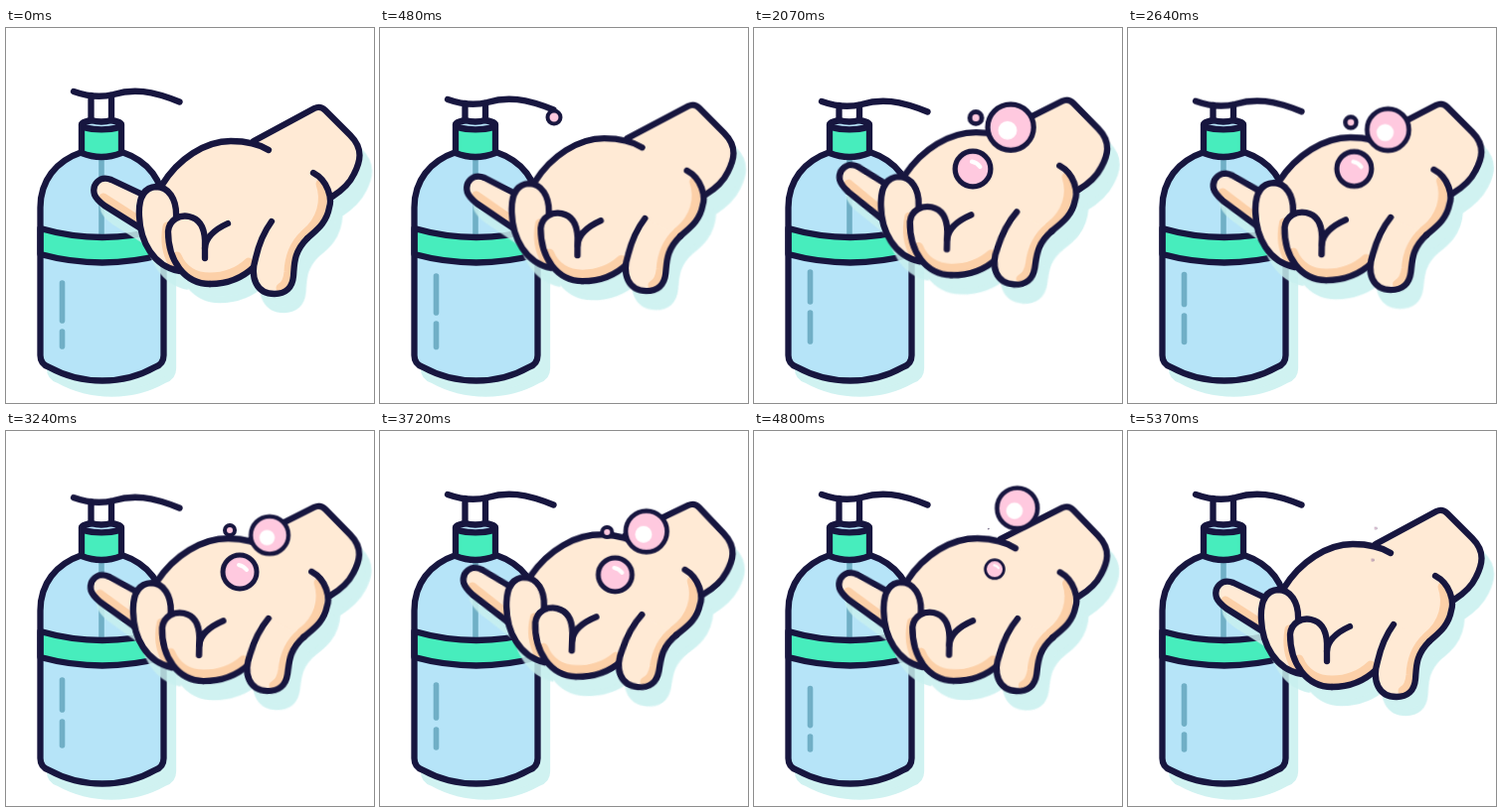
An HTML page that plays this animation: 370x378 px, repeating every 5.4 s.

```html
<!DOCTYPE html>
<html lang="en">
<head>
<meta charset="utf-8">
<title>Hand sanitizer</title>
<style>
html, body { margin: 0; width: 100%; height: 100%; overflow: hidden; background: #fff; }
svg { display: block; width: 100%; height: 100%; }

.line, .shape, .bubble circle { stroke: #17163f; stroke-linecap: round; stroke-linejoin: round; }
.line { fill: none; stroke-width: 6.3; }
.shape { stroke-width: 6.3; }
.skin { fill: #ffead5; }
.shade { fill: none; stroke: #fcd0a8; stroke-width: 9; stroke-linecap: round; }
.shadow { fill: #c8f0ef; stroke: #c8f0ef; stroke-width: 6.3; stroke-linejoin: round; opacity: .85; }
.mark { fill: none; stroke: #70afc6; stroke-width: 5.6; stroke-linecap: round; }
.bubble circle { fill: #ffc9df; }
.bubble .gleam { fill: #fff; stroke: none; }
.bubble path { fill: none; stroke: #fff; stroke-width: 4; stroke-linecap: round; }

.pump, .hand, .index, .thumb, .mark, .bubble { animation: 5400ms linear infinite; }
.pump, .hand, .thumb { animation-timing-function: ease-in-out; }
.pump { animation-name: pump; }
.hand { animation-name: hand; }
.index { animation-name: index; transform-origin: 97px 165px; }
.thumb { animation-name: thumb; transform-origin: 303px 212px; }
.upper { animation-name: upper; }
.lower { animation-name: lower; }
.big { animation-name: big; }
.mid { animation-name: mid; }
.tiny { animation-name: tiny; }
.drop { animation-name: drop; }

@keyframes pump {
  0%, 69%, 100% { transform: translateY(0); }
  13%, 46% { transform: translateY(10px); }
}
@keyframes hand {
  0%, 100% { transform: matrix(1, 0, 0, 1, 0, 0); }
  27.8% { transform: matrix(1.02, .03, -.03, 1.004, -3.8, -20.4); }
  50% { transform: matrix(1.02, .004, -.02, 1, -4.7, -4.5); }
  78% { transform: matrix(1.015, .05, -.04, 1, -1.5, -22.5); }
}
@keyframes thumb {
  0%, 100% { transform: rotate(0); }
  27.8% { transform: rotate(4.5deg); }
  50% { transform: rotate(1deg); }
  78% { transform: rotate(4deg); }
}
@keyframes index {
  0%, 100% { transform: translate(0, 0) rotate(0); }
  25% { transform: translate(1px, 4px) rotate(5deg); }
  38.3% { transform: translate(4px, -3px) rotate(6deg); }
  60% { transform: translate(3px, 1px) rotate(3deg); }
  79% { transform: translate(1px, 0) rotate(5deg); }
}
@keyframes upper {
  0%, 100% { d: path("M56.5 257V295"); }
  8.9% { d: path("M56.5 250V287"); }
  25% { d: path("M56.5 246V282"); }
  38.3% { d: path("M56.5 246V276"); }
  60% { d: path("M56.5 251V281"); }
  79% { d: path("M56.5 262V298"); }
}
@keyframes lower {
  0%, 100% { d: path("M56.5 306V321"); }
  8.9% { d: path("M56.5 298V321.5"); }
  25% { d: path("M56.5 293V320.5"); }
  38.3% { d: path("M56.5 287V316"); }
  60% { d: path("M56.5 293V317"); }
  79% { d: path("M56.5 310V321"); }
}
@keyframes big {
  0%, 12% { transform: translate(238px, 108px) scale(0); }
  25% { transform: translate(251px, 98px) scale(.98); }
  38.3% { transform: translate(258px, 100px) scale(1.05); }
  60% { transform: translate(265px, 105px) scale(.86); }
  79% { transform: translate(271px, 97px) scale(1.04); }
  88% { transform: translate(266px, 76px) scale(1); }
  99.4% { transform: translate(249px, 98px) scale(.06); }
  100% { transform: translate(249px, 98px) scale(0); }
}
@keyframes mid {
  0%, 13% { transform: translate(206px, 122px) scale(0); }
  25% { transform: translate(214px, 129px) scale(1); }
  38.3% { transform: translate(220px, 142px) scale(1.05); }
  60% { transform: translate(235px, 142px) scale(1); }
  79% { transform: translate(238px, 148px) scale(1); }
  99.4% { transform: translate(246px, 130px) scale(.08); }
  100% { transform: translate(246px, 130px) scale(0); }
}
@keyframes tiny {
  0%, 15% { transform: translate(217px, 95px) scale(0); }
  25% { transform: translate(221px, 91px) scale(.95); }
  38.3% { transform: translate(223px, 90.5px) scale(1.2); }
  60% { transform: translate(225px, 100px) scale(1); }
  79% { transform: translate(232px, 104px) scale(1); }
  90%, 100% { transform: translate(236px, 98px) scale(0); }
}
@keyframes drop {
  0%, 4% { transform: translate(175px, 78px) scale(0); }
  8.9% { transform: translate(175px, 90px) scale(1); }
  25% { transform: translate(175px, 113px) scale(1.05); }
  32%, 100% { transform: translate(180px, 122px) scale(0); }
}
</style>
</head>
<body>
<svg viewBox="0 0 370 378" preserveAspectRatio="none">
  <defs>
    <path id="bottle" d="M76.500 125C50 134 34.500 154 34.500 181V330Q34.500 339 43.500 342C76 360 118 360 149.500 342Q158.500 339 158.500 330V181C158.500 154 143 134 116.500 125"/>
    <path id="palm" d="M157 158C173 132 200 114 226 114L249 114L310 81Q316 78 321 83L346 108C360 122 356 135 350 147Q344 160 326 172C325 195 312 205 303 212L250 240Q232 258 205 258C180 258 163 235 163 205L150 180Z"/>
    <path id="thumb" d="M303 212C289 226 290 238 289 250C288 262 281 268 270 268C252 268 245 252 251 232Q256 210 267 195"/>
    <path id="index" d="M142 170L106 153C94 148 86 158 89 168C91 173 95 176 99 179L142 206"/>
    <path id="middle" d="M171 191C172 172 163 160 151 160C138 161 133 172 134 190C135 215 148 240 174 245"/>
    <path id="ring" d="M205 258C180 258 163 235 163 205C164 193 175 188 184 190Q199 193 200 214V232"/>
    <clipPath id="neck"><path d="M0 0H370V94H0Z"/></clipPath>
  </defs>

  <!-- bottle -->
  <use href="#bottle" class="shadow" x="9.500" y="13"/>
  <use href="#bottle" fill="#b6e4f8"/>
  <path class="mark" d="M96 132V208"/>
  <path class="shape" fill="#47edbd" d="M34.500 202Q97 220 158.500 202V228Q97 245 34.500 228Z"/>
  <use href="#bottle" class="line"/>
  <path class="mark upper" d="M56.500 257V295"/>
  <path class="mark lower" d="M56.500 306V321"/>

  <!-- cap and pump -->
  <path class="shape" fill="#47edbd" d="M76 98V126Q96 134 116 126V98Z"/>
  <ellipse class="shape" fill="#b6e4f8" cx="96" cy="97.500" rx="20" ry="4.800"/>
  <g clip-path="url(#neck)">
    <g class="pump">
      <path class="shape" fill="#fff" d="M85.500 68V110H106V68"/>
      <path class="line" d="M68 64C82 69 96 70 108 67C128 61 146 63 174.500 74.500"/>
    </g>
  </g>
  <path class="line" d="M85.500 93Q96 96 106 93"/>

  <!-- hand -->
  <g class="hand">
    <g class="shadow" transform="translate(9.500 16)">
      <use href="#palm"/>
      <use href="#thumb" class="thumb"/>
      <use href="#index" class="index"/>
      <use href="#middle"/>
    </g>
    <g class="index">
      <use href="#index" class="skin"/>
      <path class="shade" d="M98 171L140 198"/>
      <use href="#index" class="line"/>
    </g>
    <use href="#palm" class="skin"/>
    <path class="shade" d="M316 157C322 174 317 194 301 207"/>
    <use href="#middle" class="skin"/>
    <path class="shade" d="M162 200Q158 222 168 238"/>
    <use href="#middle" class="line"/>
    <use href="#ring" class="skin"/>
    <path class="shade" d="M172 230C178 244 190 251 205 251Q228 251 244 236"/>
    <use href="#ring" class="line"/>
    <path class="line" d="M223 197Q201 207 200 222M250 240Q232 258 205 258"/>
    <path class="line" d="M157 158C173 132 200 114 226 114Q250 114 264 123"/>
    <path class="line" d="M249 114L310 81Q316 78 321 83L346 108C360 122 356 135 350 147Q344 160 328 170"/>
    <g class="thumb">
      <use href="#thumb" class="skin"/>
      <path class="shade" d="M300 208Q285 222 284 246Q283 258 276 262"/>
      <use href="#thumb" class="line"/>
    </g>
    <path class="line" d="M309 146C324 154 328 172 325 181C322 198 310 205 303 212"/>
  </g>

  <!-- foam -->
  <g class="bubble drop"><circle r="6.500" stroke-width="4"/></g>
  <g class="bubble tiny"><circle r="5" stroke-width="4"/></g>
  <g class="bubble mid">
    <circle r="17" stroke-width="5"/>
    <path d="M-1 -7Q4 -6 7 -2"/>
  </g>
  <g class="bubble big">
    <circle r="22" stroke-width="5"/>
    <circle class="gleam" cx="-3" cy="3" r="9"/>
  </g>
</svg>
</body>
</html>
```
